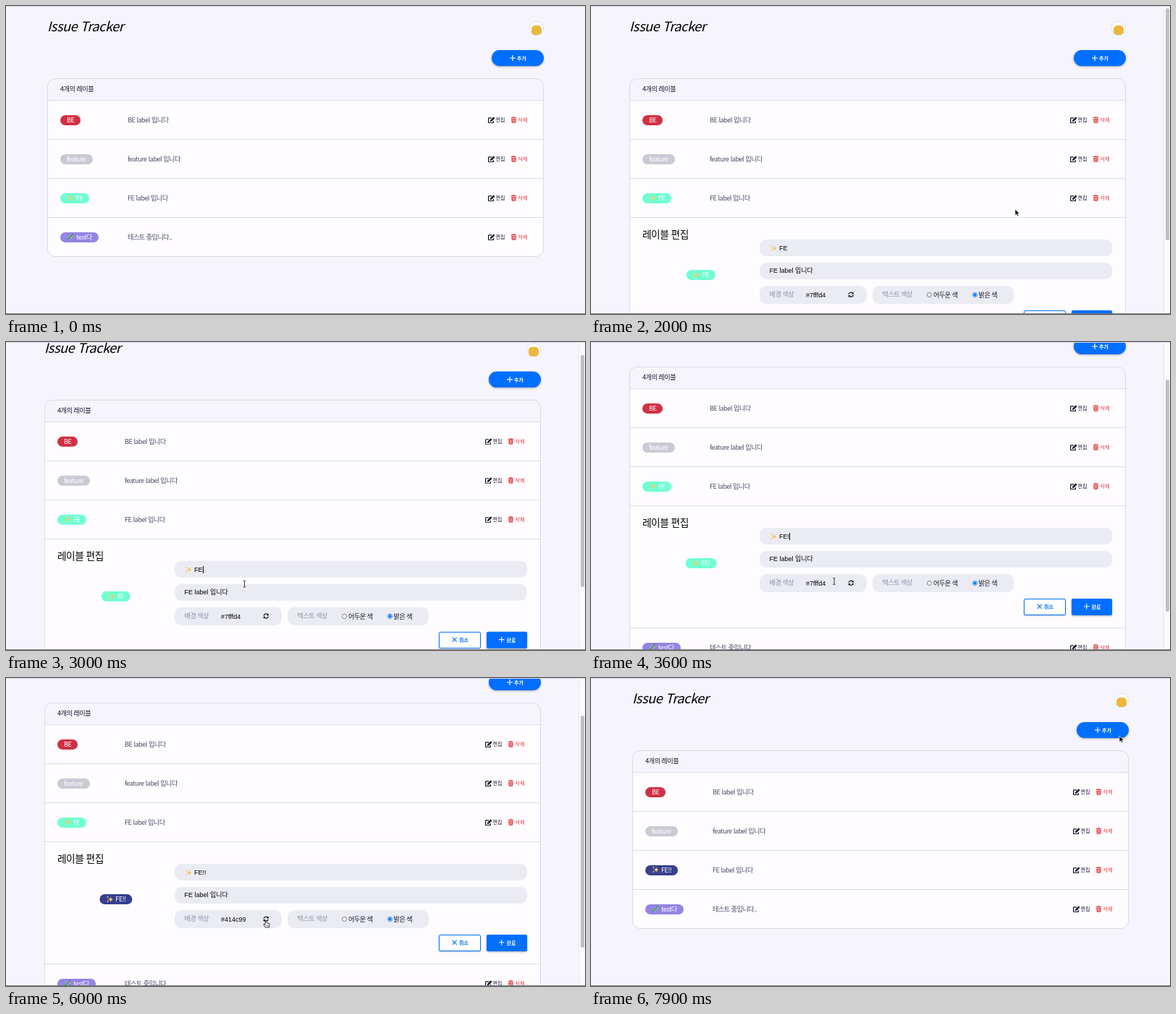
Write an HTML page that moves like this. It is 800 px wide and 426 px high and loops after 8 s.

```html
<!DOCTYPE html>
<html lang="ko">
<head>
<meta charset="utf-8">
<title>Issue Tracker</title>
<style>
html, body { margin: 0; width: 100%; height: 100%; overflow: hidden; }
#stage { position: relative; width: 800px; height: 426px; overflow: hidden; background: #f6f5fe;
  font: 9.14px/20px "Noto Sans CJK KR", "Noto Sans CJK", "Noto Sans", sans-serif; letter-spacing: -.056em; color: #14142b; }
#stage div, #stage svg, .t { position: absolute; box-sizing: border-box; }
.t { white-space: pre; }
#page { left: 0; top: 0; width: 800px; height: 600px; }
#table { left: 57px; top: 100px; width: 686px; border: 1px solid #d9dbe9; border-radius: 11px;
  background: linear-gradient(transparent 30px, #fefcff 30px); }
.row { left: 57px; width: 685px; height: 54px; border-top: 1px solid #d9dbe9; }
.pill { height: 14px; line-height: 12.5px; padding: 0 9px; border-radius: 7px; color: #fff; white-space: pre; }
.pill svg, .name svg { position: static !important; vertical-align: -1.5px; margin-right: 3px; }
.small { font-size: 7px; font-weight: 500; letter-spacing: 0; }
.bold { font-weight: 700; }
.desc { color: #4e4b66; }
.gray { color: #8f90aa; }
.red { color: #e5383b; }
.white { color: #fff; }
.blue { color: #006fff; }
.btn { background: #006fff; box-shadow: 0 1px 3px #0005; }
.box { background: #ebecf3; border-radius: 9px; }
.in { font: 9px/20px "Liberation Sans", "Noto Sans CJK KR", sans-serif; letter-spacing: 0; color: #000; }
#caret { display: inline-block; width: 1px; height: 10px; background: #000; vertical-align: -2px; }
</style>
</head>
<body>
<div id="stage">
  <div id="page"></div>
  <div id="bar" style="left:791px;top:1px;width:9px;height:425px;background:#fbfafd;border-left:1px solid #e7e6ec">
    <div id="thumb" style="left:2px;width:5px;height:321px;border-radius:3px;background:#bfbfc2"></div>
  </div>
  <div style="left:0;top:0;width:800px;height:1px;background:#d9d8e0"></div>
  <div style="left:0;top:425px;width:800px;height:1px;background:#77777f"></div>
  <svg id="cursor" width="14" height="16" style="left:0;top:0;overflow:visible"></svg>
</div>
<script>
const $ = id => document.getElementById(id);
const page = $('page');

// Icons are drawn on a 10 x 10 grid.
const line = (d, w = 1.2) => `<path d="${d}" fill="none" stroke="currentColor" stroke-width="${w}"/>`;
const fill = (d, c = 'currentColor') => `<path d="${d}" fill="${c}"/>`;
const icons = {
  plus: line('M5 1V9M1 5H9'),
  cross: line('M1.8 1.8L8.2 8.2M8.2 1.8L1.8 8.2'),
  edit: line('M5.4 2H1.3Q.7 2 .7 2.6V8.6Q.7 9.2 1.3 9.2H7.2Q7.8 9.2 7.8 8.6V6.4', 1.3) +
    fill('M3 7.4L3.3 5.3L7.7.9Q8.2.4 8.7.9L9.6 1.8Q10 2.3 9.6 2.8L5.2 7.1Z'),
  trash: fill('M.8 1.2H3.2L3.7.4H6.3L6.8 1.2H9.2V2.3H.8ZM1.4 3H8.6L8.1 9Q8 9.8 7.2 9.8H2.8Q2 9.8 1.9 9Z') +
    '<path d="M3.5 4V8.6M5 4V8.6M6.5 4V8.6" stroke="#fefcff" stroke-width=".6"/>',
  refresh: line('M1.4 4.5A3.7 3.7 0 0 1 8 2.8M8.6 5.5A3.7 3.7 0 0 1 2 7.2', 1.5) +
    fill('M9.2.6V4.2H5.6ZM.8 9.4V5.8H4.4Z'),
  spark: fill('M6.2 1.3Q6.6 4.6 9.8 5.2Q6.6 5.8 6.2 9.2Q5.7 5.8 2.6 5.2Q5.7 4.6 6.2 1.3ZM2.3.3Q2.5 1.7 3.9 2Q2.5 2.3 2.3 3.7Q2 2.3.6 2Q2 1.7 2.3.3ZM2.2 6.3Q2.4 7.7 3.8 8Q2.4 8.3 2.2 9.8Q2 8.3.6 8Q2 7.7 2.2 6.3Z', '#f6c95c'),
  tube: line('M8.1 1.9L2.2 8', 2.9) +
    '<path d="M7 3L2.2 8" stroke="#2f9a4c" stroke-width="2.3" stroke-linecap="round"/><path d="M6.6 .7L9.4 3.4" stroke="#4b6a60"/>'
};
const icon = (name, size = 10, style = '') =>
  `<svg viewBox="0 0 10 10" width="${size}" height="${size}" style="${style}">${icons[name]}</svg>`;
const iconAt = (name, x, y, size, cls = '') =>
  `<span class="t ${cls}" style="left:${x}px;top:${y - size / 2}px">${icon(name, size)}</span>`;
const text = (x, y, s, cls = '', style = '') =>
  `<span class="t ${cls}" style="left:${x}px;top:${y - 10}px;${style}">${s}</span>`;
const box = (x, y, w, h, cls, style = '') =>
  `<div class="${cls}" style="left:${x}px;top:${y}px;width:${w}px;height:${h}px;${style}"></div>`;
const radio = (x, on) => box(x - 3.5, 396, 7, 7, '', on
  ? 'border-radius:50%;border:1px solid #0075ff;background:radial-gradient(#0075ff 1.8px,#fff 2.2px)'
  : 'border-radius:50%;border:1px solid #767676;background:#fff');

const rows = [
  ['BE', '#d12f42', 'BE label 입니다'],
  ['feature', '#c9cad4', 'feature label 입니다'],
  ['', '', 'FE label 입니다'],
  [icon('tube') + 'test다', '#9484e4', '테스트 중입니다..']
];

page.innerHTML =
  text(57, 27, 'Issue Tracker', '', 'font-size:18.3px;font-style:italic;font-weight:500;color:#000') +
  box(723, 21, 20, 20, '', 'border-radius:50%;background:#fff;border:1px solid #dfdfea') +
  box(726, 26.5, 13.5, 13, '', 'border-radius:5px;background:#ebb83c') +
  box(671, 60.5, 71.5, 22.5, 'btn', 'border-radius:11px') +
  iconAt('plus', 694.5, 72, 10, 'white') + text(706, 71.5, '추가', 'small white bold') +
  '<div id="table"></div>' + text(75, 114, '4개의 레이블', '', 'font-weight:500') +
  rows.map(([label, color, desc], i) =>
    `<div class="row" id="row${i}" style="top:${130 + 54 * i}px">
      <div class="pill" style="left:18px;top:19.5px;background:${color}">${label}</div>` +
      text(111, 25.5, desc, 'desc') +
      iconAt('edit', 609, 26.5, 9.5) + text(619.5, 26, '편집', 'small') +
      iconAt('trash', 639.5, 26.5, 9, 'red') + text(650.5, 26, '삭제', 'small red') +
    '</div>').join('') +
  `<div id="panel" style="left:4px;top:0">
    <div style="left:53px;top:292px;width:685px;height:1px;background:#d9dbe9"></div>` +
    text(71, 314.5, '레이블 편집', '', 'font-size:13.7px;color:#000') +
    '<div class="pill" id="preview" style="left:152px;top:365px;transform:translateX(-50%)"></div>' +
    box(233, 323, 487, 23, 'box') + box(233, 355, 487, 23, 'box') +
    box(233, 387, 147.5, 25, 'box') + box(389, 387, 194.5, 25, 'box') +
    text(247, 335, icon('spark') + '<span id="name"></span><i id="caret"></i>', 'in name') +
    text(246.5, 366, 'FE label 입니다', 'in') +
    text(246.5, 398, '배경 색상', 'gray') + text(297, 399.5, '', 'in hex') +
    iconAt('refresh', 355, 399, 8.5) +
    text(402.5, 398, '텍스트 색상', 'gray') +
    radio(467.5, false) + text(473, 399, '어두운 색') +
    radio(530.5, true) + text(535.5, 399, '밝은 색') +
    box(598, 421, 57.5, 23, '', 'background:#fff;border:1px solid #006fff;border-radius:2px;box-shadow:0 1px 2px #0003') +
    iconAt('cross', 615, 432, 9.5, 'blue') + text(626, 431.5, '취소', 'small blue bold') +
    '<div class="btn" id="done" style="left:664px;top:421px;width:56px;height:23px;border-radius:2px"></div>' +
    iconAt('plus', 680, 432, 9.5, 'white') + text(691.5, 431.5, '완료', 'small white bold') +
  '</div>';

const cursors = {
  none: '',
  arrow: '<path d="M0 0V8.6L2 6.8L3.3 9.8L4.8 9.1L3.5 6.3H6.2Z" fill="#000" stroke="#fff" stroke-width=".7"/>',
  hand: '<path d="M-.9 1Q0-.6 .9 1V3.6L4.6 4.4Q5.4 4.8 5.2 6L4.3 10H-.4L-3 6.3Q-3.2 5.2-2 5.3L-.9 6.4Z" fill="#fff" stroke="#000" stroke-width=".8"/><path d="M.9 6.4V8.4M2.2 6.4V8.4M3.4 6.4V8.4" stroke="#000" stroke-width=".5"/>',
  beam: '<path d="M-1.8-4.5Q0-4.5 0-3.5Q0-4.5 1.8-4.5M0-3.5V3.5M-1.8 4.5Q0 4.5 0 3.5Q0 4.5 1.8 4.5" fill="none" stroke="#222" stroke-width=".9"/>'
};

// Timelines: [ms, value...]
const path = [[100, 745, 314], [900, 677, 262], [1800, 677, 262], [2400, 329, 335], [2900, 329, 335],
  [3500, 336, 331], [3800, 336, 331], [4300, 690, 366], [4750, 690, 366], [5200, 359, 335],
  [6050, 359, 335], [6500, 690, 366], [6850, 690, 366], [7400, 425, 318], [7900, 730, 80]];
const kinds = [[0, 'none'], [100, 'arrow'], [850, 'hand'], [1500, 'arrow'], [2200, 'beam'], [3900, 'arrow'],
  [4200, 'hand'], [4400, 'none'], [4750, 'arrow'], [5100, 'hand'], [6150, 'arrow'], [6400, 'hand'], [6800, 'arrow']];
const names = [[0, 'FE'], [3300, 'FE!'], [4400, 'FE!!']];
const scrolls = [[2800, 0], [2900, 5], [3000, 20], [3200, 50], [3300, 60], [3500, 66]];
const OPEN = 1500, CLOSE = 6800, RECOLOR = 5700, LOOP = 8000, GROW = 169;

const held = (steps, t) => steps.filter(s => s[0] <= t).pop()[1];
function tween(keys, t, ease) {
  const i = keys.findIndex(k => k[0] > t);
  if (i < 0) return keys[keys.length - 1].slice(1);
  if (!i) return keys[0].slice(1);
  const a = keys[i - 1], b = keys[i], p = ease((t - a[0]) / (b[0] - a[0]));
  return a.slice(1).map((v, j) => v + (b[j + 1] - v) * p);
}
const smooth = p => p * p * (3 - 2 * p);
const linear = p => p;

const rowPill = document.querySelector('#row2 .pill');
const hex = document.querySelector('.hex');
const setHtml = (el, s) => { if (el.shown !== s) el.innerHTML = el.shown = s; };

function render(t) {
  const open = t >= OPEN && t < CLOSE;
  const scroll = open ? tween(scrolls, t, linear)[0] : 0;
  const extra = open ? GROW : 0;
  const name = held(names, t);
  const color = t < RECOLOR ? '#70ffd2' : '#363f90';

  page.style.transform = `translate(${open ? -4 : 0}px, ${-scroll}px)`;
  $('table').style.height = 247 + extra + 'px';
  $('row3').style.top = 292 + extra + 'px';
  $('panel').style.display = $('bar').style.display = open ? 'block' : 'none';
  $('thumb').style.top = 1.5 + scroll * .755 + 'px';

  setHtml(rowPill, icon('spark') + (t < CLOSE ? 'FE' : name));
  rowPill.style.background = t < CLOSE ? '#70ffd2' : color;
  setHtml($('preview'), icon('spark') + name);
  $('preview').style.background = color;
  setHtml($('name'), name);
  setHtml(hex, t < RECOLOR ? '#7fffd4' : '#414c99');
  $('caret').style.visibility = t >= 2400 && t < 5400 ? 'visible' : 'hidden';
  const hover = (t >= 4200 && t < 4850) || t >= 6400;
  $('done').style.background = hover ? '#004de0' : '#006fff';

  const [x, y] = tween(path, t, smooth);
  setHtml($('cursor'), cursors[held(kinds, t)]);
  $('cursor').style.transform = `translate(${x}px, ${y}px)`;
}

const start = performance.now();
function frame() {
  render((performance.now() - start) % LOOP);
  requestAnimationFrame(frame);
}
frame();
</script>
</body>
</html>
```
